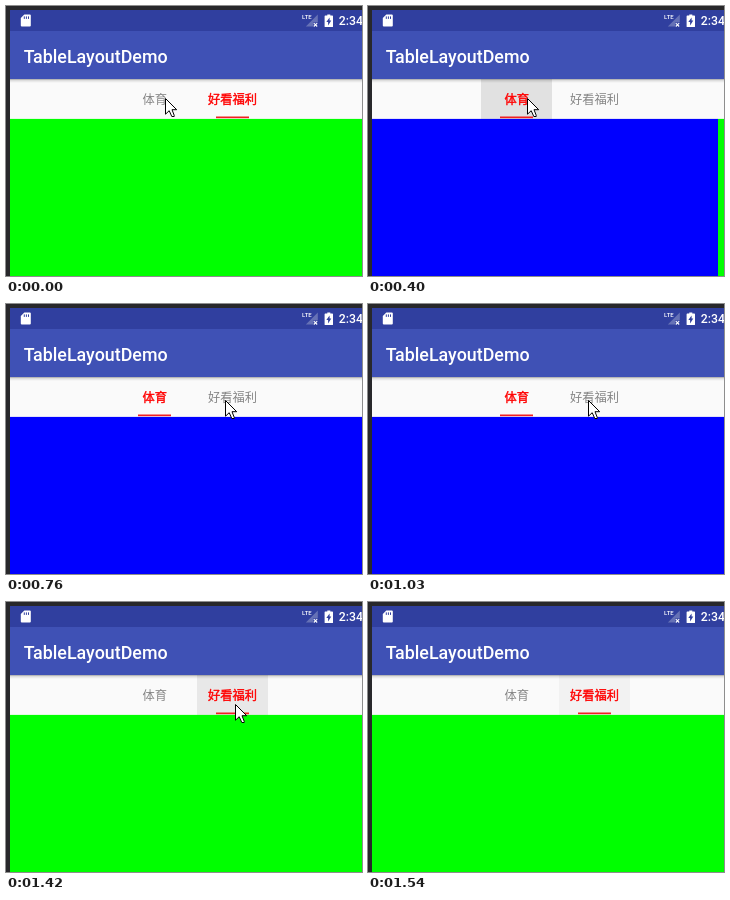
Write an HTML page that moves like this. It is 356 by 270 pixels and loops after 2030 ms.

```html
<!DOCTYPE html>
<html lang="zh">
<head>
<meta charset="utf-8">
<title>TableLayoutDemo</title>
<style>
html, body { margin: 0; width: 100%; height: 100%; overflow: hidden; background: #28282b; }
svg { display: block; width: 356px; height: 270px; }
.latin { font-family: Roboto, "Noto Sans", sans-serif; font-weight: 500; fill: #fff; }
.tab { font: 400 12.25px "Noto Sans CJK SC", "Noto Sans CJK", "Noto Sans CJK JP", sans-serif; text-anchor: middle; fill: #858585; }
.on { fill: #f00; stroke: #f00; stroke-width: .4; }

.pages, .bar, .cursor, .press, .first, .second { animation: 2030ms step-end infinite; }
.pages { animation-name: pages; }
.bar { animation-name: bar; }
.cursor { animation-name: cursor; }
.press.a { animation-name: press-a; }
.press.b { animation-name: press-b; }
.first { animation-name: first; }
.second { animation-name: second; }

@keyframes pages {
  0% { transform: translateX(-352px); }
  19.704% { transform: translateX(-6px); }
  25.615% { transform: translateX(0); }
  64.039% { transform: translateX(-348px); }
  69.95%, 100% { transform: translateX(-352px); }
}
@keyframes bar {
  0%, 64.039%, 100% { transform: translateX(78px); }
  19.704% { transform: translateX(0); }
}
@keyframes first {
  0%, 64.039%, 100% { opacity: 0; }
  19.704% { opacity: 1; }
}
@keyframes second {
  0%, 64.039%, 100% { opacity: 1; }
  19.704% { opacity: 0; }
}
@keyframes press-a {
  0%, 37.438%, 100% { opacity: 0; }
  19.704% { opacity: 1; }
  25.615% { opacity: .68; }
  31.527% { opacity: .34; }
}
@keyframes press-b {
  0% { opacity: 0; }
  64.039% { opacity: 1; }
  69.95% { opacity: .68; }
  75.862%, 100% { opacity: .34; }
}
@keyframes cursor {
  0% { transform: translate(159px, 92px); opacity: 1; }
  25.615% { transform: translate(163px, 92px); opacity: 1; }
  31.527% { transform: translate(197px, 95px); opacity: 1; }
  37.438% { transform: translate(219px, 96px); opacity: 1; }
  50.738% { transform: translate(220px, 96px); opacity: 1; }
  64.039% { transform: translate(229px, 102px); opacity: 1; }
  75.862%, 100% { transform: translate(229px, 102px); opacity: 0; }
}
</style>
</head>
<body>
<svg viewBox="0 0 356 270" xmlns="http://www.w3.org/2000/svg">
  <defs>
    <linearGradient id="shade" x2="0" y2="1">
      <stop offset="0" stop-opacity=".34"/>
      <stop offset=".4" stop-opacity=".1"/>
      <stop offset="1" stop-opacity="0"/>
    </linearGradient>
    <clipPath id="screen"><rect x="4" y="4" width="352" height="266"/></clipPath>
  </defs>

  <rect width="356" height="270" fill="#28282b"/>

  <g clip-path="url(#screen)">
    <rect x="4" y="4" width="352" height="21" fill="#303f9f"/>
    <rect x="4" y="25" width="352" height="48" fill="#3f51b5"/>
    <rect x="4" y="73" width="352" height="40" fill="#fafafa"/>

    <!-- status icons -->
    <g transform="translate(-.2 .4)">
      <path d="M18.500 8H24q1 0 1 1V19q0 1-1 1H16q-1 0-1-1V11.500Z" fill="#fff"/>
      <path d="M18.500 10v2.500M20.600 10v2.500M22.700 10v2.500" stroke="#303f9f"/>
      <path d="M312 8V20H300Z" fill="#6672b6"/>
      <path d="M307.500 16h5v5h-5Z" fill="#303f9f"/>
      <path d="M308 16.700l3.400 3.400M311.400 16.700l-3.400 3.400" stroke="#fff" stroke-width="1.1"/>
      <text class="latin" x="296.200" y="12.700" font-size="6" font-weight="700">LTE</text>
      <path d="M321.500 8h3v1.200h2q.7 0 .7.7V20q0 .7-.7.7h-7q-.7 0-.7-.7V9.900q0-.7.7-.7h2Z" fill="#fff"/>
      <path d="M323.800 11v3.200h1.700L322.300 19v-3.400h-1.800Z" fill="#303f9f"/>
      <text class="latin" x="333" y="19" font-size="12.25">2:34</text>
    </g>

    <text class="latin" x="17.700" y="56.500" font-size="17.85">TableLayoutDemo</text>

    <!-- tabs -->
    <rect class="press a" x="113" y="73" width="71" height="40" fill="#e1e1e1"/>
    <rect class="press b" x="191" y="73" width="71" height="40" fill="#e1e1e1"/>
    <rect x="4" y="73" width="352" height="4" fill="url(#shade)"/>
    <g class="first">
      <text class="tab on" x="148.700" y="98">体育</text>
      <text class="tab" x="226.500" y="98">好看福利</text>
    </g>
    <g class="second">
      <text class="tab" x="148.700" y="98">体育</text>
      <text class="tab on" x="226.500" y="98">好看福利</text>
    </g>
    <rect class="bar" x="132" y="110.500" width="33" height="1.700" fill="#f12020"/>

    <g class="pages">
      <rect x="4" y="112.900" width="352" height="158" fill="#00f"/>
      <rect x="356" y="112.900" width="352" height="158" fill="#0f0"/>
    </g>
  </g>

  <path class="cursor" d="M.5 .5V16.200L4.200 12.700L6.800 18.500H9.200V17.300L7 11.700H11.700Z" fill="#fff" stroke="#000"/>
</svg>
</body>
</html>
```
